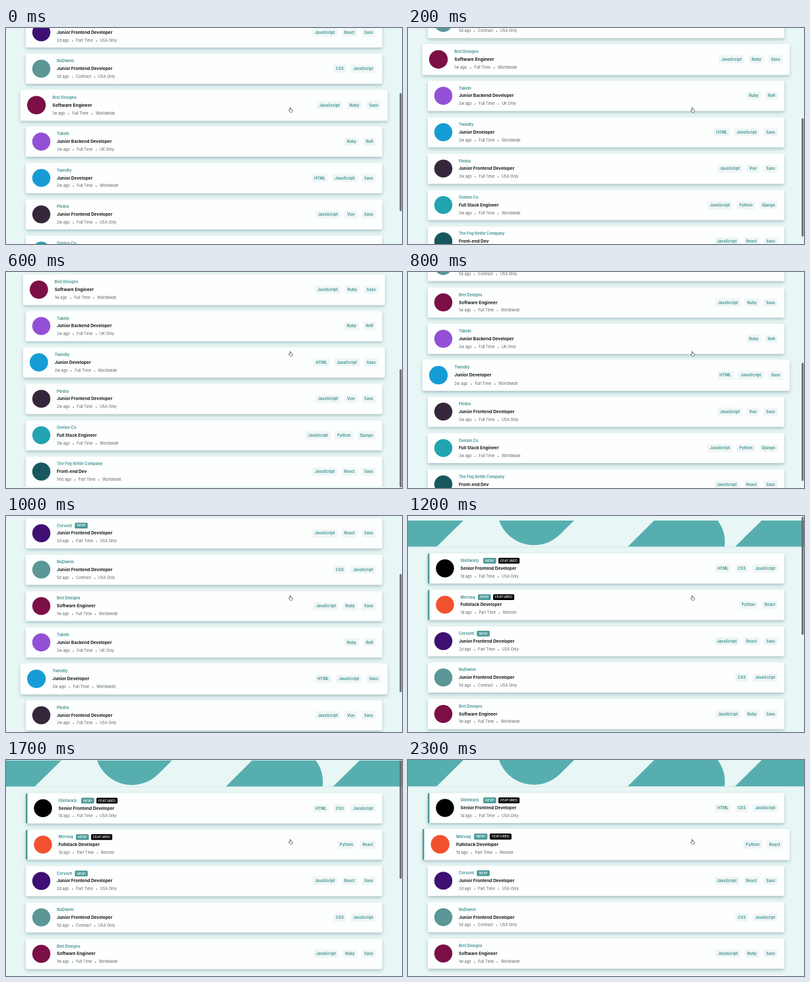
An HTML page for the animation above (2400 ms loop, 600x329 px).

```html
<!DOCTYPE html>
<html lang="en">
<head>
<meta charset="utf-8">
<title>Job listings</title>
<style>
  html, body { margin: 0; width: 100%; height: 100%; overflow: hidden; background: #e8f7f6; }
  svg { display: block; width: 600px; height: 329px; font-family: Inter, "Liberation Sans", sans-serif; }
  .name { font-size: 5.8px; font-weight: 700; fill: #4b9a99; }
  .title { font-size: 6.5px; font-weight: 700; fill: #161a1a; }
  .meta { font-size: 5.65px; fill: #5d6363; }
  .dot { font-size: 5px; }
  .tag { font-size: 5.8px; font-weight: 700; fill: #4b9a99; }
  .badge { font-size: 5px; font-weight: 500; fill: #fff; text-anchor: middle; }
</style>
</head>
<body>
<svg id="stage" viewBox="0 0 600 329">
  <defs>
    <filter id="shadow" x="-5%" y="-30%" width="110%" height="180%">
      <feDropShadow dx="0" dy="2.5" stdDeviation="2.5" flood-color="#2f5c5c" flood-opacity=".34"/>
    </filter>
    <clipPath id="pageClip"><rect width="600" height="595"/></clipPath>
  </defs>
  <rect width="600" height="329" fill="#e8f7f6"/>
  <g id="page" clip-path="url(#pageClip)">
    <g fill="#57aeaf">
      <path d="M0 0H84L43.500 40H0Z"/>
      <path d="M137.900 0A56 56 0 0 0 230.600 21.100L251.700 0Z"/>
      <path d="M373 0H469.200A56 56 0 0 1 479.600 40H333Z"/>
      <path d="M536 0H600V40H495.500Z"/>
    </g>
    <rect y="40" width="600" height=".7" fill="#c9dfdf"/>
    <g id="cards"></g>
  </g>
  <rect id="thumb" x="596.4" width="3" height="180" rx="1.5" fill="#676c6d"/>
  <path d="M430 125.200V121.900q0-.8.700-.8t.7.800v2l2.300.5q.6.200.5 1l-.4 2q-.2.900-1 .9h-1.900q-.6 0-1-.6l-1.400-2q-.3-.6.200-.8t.8.300z"
        fill="#fff" stroke="#333" stroke-width=".7" stroke-linejoin="round"/>
</svg>
<script>
const LOOP = 2400, STEP = 100;
const FIRST = 50.3, PITCH = 55.45, HEIGHT = 45.7, MAX_SCROLL = 266;
const TEAL = '#4b9a99';

// company, logo colour, title, details, tags, badge positions [x, width]
const jobs = [
  ['Glintwarp', '#000', 'Senior Frontend Developer', '1d ago|Full Time|USA Only', 'HTML CSS JavaScript', 114, 137],
  ['Morvaq', '#f2512f', 'Fullstack Developer', '1d ago|Part Time|Remote', 'Python React', 106, 129],
  ['Corvunt', '#3f0f73', 'Junior Frontend Developer', '2d ago|Part Time|USA Only', 'JavaScript React Sass', 104.3],
  ['NuDwem', '#5a9796', 'Junior Frontend Developer', '5d ago|Contract|USA Only', 'CSS JavaScript'],
  ['Brel Designs', '#7b0f46', 'Software Engineer', '1w ago|Full Time|Worldwide', 'JavaScript Ruby Sass'],
  ['TukeIn', '#9350d6', 'Junior Backend Developer', '2w ago|Full Time|UK Only', 'Ruby RoR'],
  ['Twindly', '#169cd4', 'Junior Developer', '2w ago|Full Time|Worldwide', 'HTML JavaScript Sass'],
  ['Pledra', '#35273b', 'Junior Frontend Developer', '2w ago|Full Time|USA Only', 'JavaScript Vue Sass'],
  ['Ovelun Co.', '#22a3b0', 'Full Stack Engineer', '3w ago|Full Time|Worldwide', 'JavaScript Python Django'],
  ['The Fog Kettle Company', '#17585f', 'Front-end Dev', '1mo ago|Part Time|Worldwide', 'JavaScript React Sass'],
];

// time and scroll offset, including the elastic overshoot at both ends
const scrollKeys = [
  [0, 177.3], [100, 212], [200, 247], [300, 270], [400, 274.1], [600, 268],
  [700, 263], [800, 248.5], [900, 208], [1000, 157.7], [1100, 70], [1200, -6.7],
  [1300, -6.6], [1400, -4.3], [1500, -2.4], [1600, -1.1], [1700, -0.4], [2300, 0],
];

const $ = id => document.getElementById(id);
const clamp = (v, lo = 0, hi = 1) => Math.min(hi, Math.max(lo, v));
const ease = u => u * u * (3 - 2 * u);
const ramp = (t, start, length = 200) => ease(clamp((t - start) / length));

function add(parent, tag, attrs, text) {
  const el = document.createElementNS('http://www.w3.org/2000/svg', tag);
  for (const key in attrs) el.setAttribute(key, attrs[key]);
  if (text) el.textContent = text;
  parent.appendChild(el);
  return el;
}

function addBadge(card, x, width, top, fill, label) {
  add(card, 'rect', { x, y: top + 6.8, width, height: 8.8, rx: 1.5, fill });
  add(card, 'text', { x: x + width / 2, y: top + 13, class: 'badge' }, label);
}

function addTags(card, labels, top) {
  let right = 560;
  for (const label of labels.reverse()) {
    const box = add(card, 'rect', { y: top + 16.5, height: 12.5, rx: 1.5, fill: '#f0f6f6' });
    const text = add(card, 'text', { y: top + 24.9, class: 'tag' }, label);
    const width = text.getComputedTextLength() + 7.4;
    box.setAttribute('x', right - width);
    box.setAttribute('width', width);
    text.setAttribute('x', right - width + 3.7);
    right -= width + 6.8;
  }
}

function addCard([company, logo, title, details, tags, newX, featuredX], i) {
  const top = FIRST + i * PITCH;
  const inset = featuredX ? 2.5 : 0;
  const x = 77 + inset;
  const card = add($('cards'), 'g', {});
  add(card, 'rect', { x: 30, y: top, width: 540, height: HEIGHT, rx: 2, fill: '#fdfefe', filter: 'url(#shadow)' });
  if (featuredX) add(card, 'path', { d: `M32.500 ${top}v${HEIGHT}h-1q-1.500 0-1.500-1.500v${3 - HEIGHT}q0-1.500 1.500-1.500z`, fill: TEAL });
  add(card, 'circle', { cx: 53.5 + inset, cy: top + 22.7, r: 13.7, fill: logo });
  add(card, 'text', { x, y: top + 13.1, class: 'name' }, company);
  add(card, 'text', { x, y: top + 24.9, class: 'title' }, title);
  const meta = add(card, 'text', { x, y: top + 36.7, class: 'meta' });
  details.split('|').forEach((part, n) => {
    if (n) add(meta, 'tspan', { dx: 3.9, class: 'dot' }, '•');
    add(meta, 'tspan', { dx: n ? 3.9 : 0 }, part);
  });
  if (newX) addBadge(card, newX, 19.5, top, TEAL, 'NEW!');
  if (featuredX) addBadge(card, featuredX, 32, top, '#000', 'FEATURED');
  addTags(card, tags.split(' '), top);
  return card;
}

const cards = jobs.map(addCard);

function scrollAt(t) {
  const n = scrollKeys.findIndex(key => key[0] > t);
  if (n < 0) return 0;
  const [t0, a] = scrollKeys[n - 1], [t1, b] = scrollKeys[n];
  return a + (b - a) * (t - t0) / (t1 - t0);
}

function setHover(i, amount) {
  const cy = FIRST + i * PITCH + HEIGHT / 2;
  const scale = 1 + 0.03 * amount;
  cards[i].setAttribute('transform', `translate(300 ${cy}) scale(${scale}) translate(-300 ${-cy})`);
}

function render(t) {
  const scroll = scrollAt(t);
  $('page').setAttribute('transform', `translate(0 ${-scroll})`);
  $('thumb').setAttribute('y', 1 + 147 * clamp(scroll / MAX_SCROLL));
  $('thumb').setAttribute('opacity', 1 - ramp(t, 1900, 300));
  setHover(4, 1 - ramp(t, 500));
  setHover(6, ramp(t, 500));
  setHover(1, ramp(t, 2000));
}

const start = performance.now();
function tick() {
  const t = (performance.now() - start) % LOOP;
  render(Math.floor(t / STEP) * STEP);
  requestAnimationFrame(tick);
}
tick();
</script>
</body>
</html>
```
